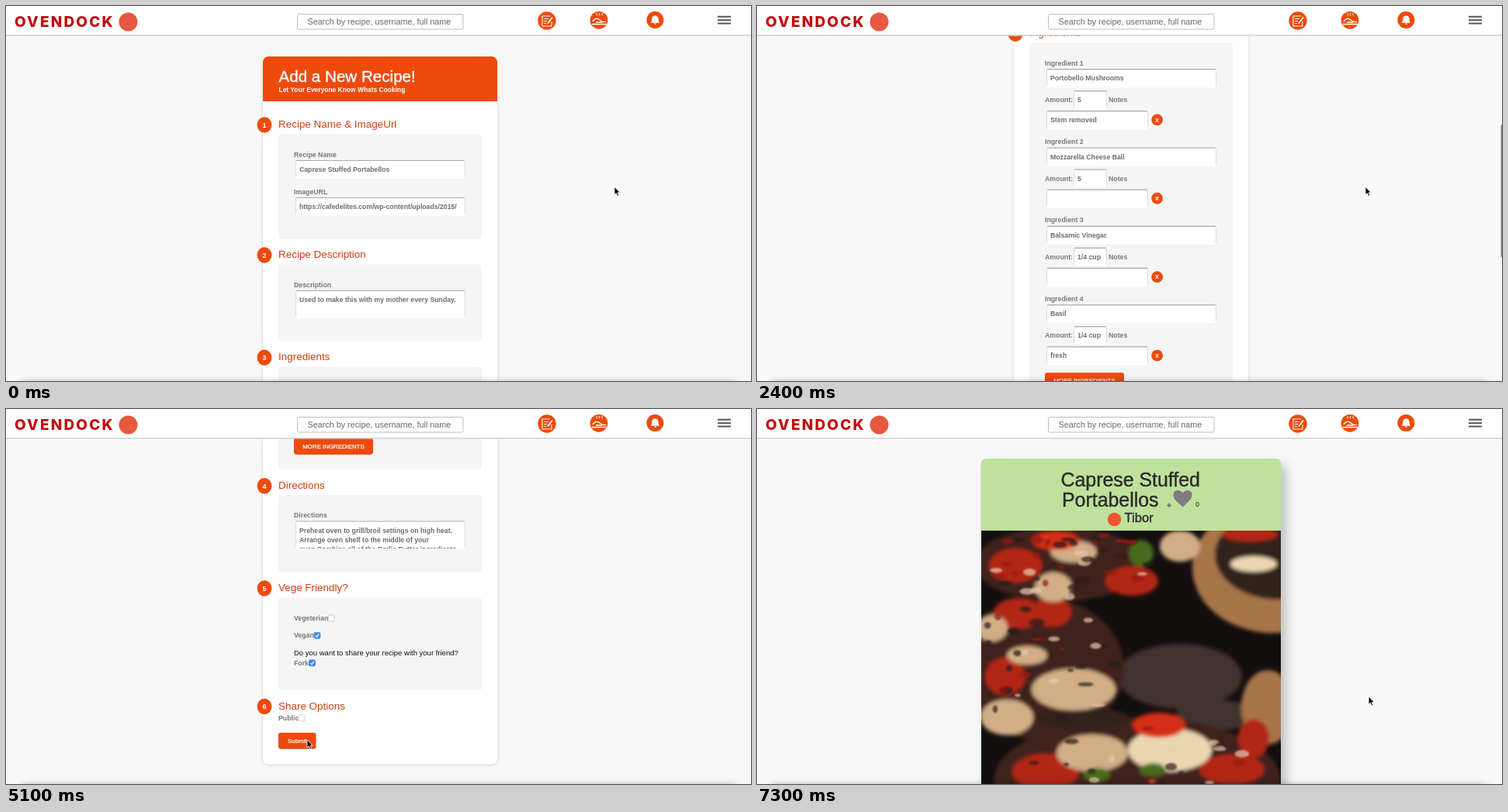
An HTML page that plays this animation: 960 px wide and 484 px high, repeating every 7400 ms.

```html
<!DOCTYPE html>
<html lang="en">
<head>
<meta charset="utf-8">
<title>Recipe form</title>
<style>
  html, body { margin: 0; width: 100%; height: 100%; overflow: hidden; background: #f8f8f8; }
  svg { display: block; width: 960px; height: 484px; font-family: "Liberation Sans", Arial, sans-serif; }
  .logo { font: 800 19px Inter, sans-serif; letter-spacing: 2.2px; fill: #c40a0c; }
  .search { font-size: 10.8px; fill: #686868; }
  .title { font-size: 20.6px; fill: #fff; stroke: #fff; stroke-width: .4px; }
  .subtitle { font-size: 8.45px; font-weight: bold; fill: #fff; }
  .heading { font-size: 13.45px; fill: #d23c10; }
  .label { font-size: 8.75px; font-weight: bold; fill: #777; }
  .value { font-size: 8.7px; font-weight: bold; fill: #6c6c6c; }
  .plain { font-size: 9.5px; fill: #111; }
  .badge { font-size: 9px; font-weight: bold; fill: #fff; text-anchor: middle; }
  .button { font-size: 7.85px; fill: #fff; stroke: #fff; stroke-width: .25px; text-anchor: middle; }
  .dish { font-size: 24.9px; fill: #2b2b2b; stroke: #2b2b2b; stroke-width: .4px; }
  .author { font-size: 16.6px; fill: #2b2b2b; stroke: #2b2b2b; stroke-width: .35px; }
  .count { font-size: 9px; fill: #222; }
</style>
</head>
<body>
<svg id="stage" viewBox="0 0 960 484"></svg>
<script>
const LOOP = 7400, STEP = 100, PAGE_CHANGE = 5700;
const ORANGE = '#ee4a0c';

const text = (cls, x, y, s) => `<text class="${cls}" x="${x}" y="${y}">${s}</text>`;
const rect = (x, y, w, h, fill, extra = '') =>
  `<rect x="${x}" y="${y}" width="${w}" height="${h}" fill="${fill}" ${extra}/>`;
const circle = (x, y, r, fill, extra = '') => `<circle cx="${x}" cy="${y}" r="${r}" fill="${fill}" ${extra}/>`;
const ellipse = (x, y, rx, ry, fill, extra = '') =>
  `<ellipse cx="${x}" cy="${y}" rx="${rx}" ry="${ry}" fill="${fill}" ${extra}/>`;
const line = (d, color, width, extra = '') =>
  `<path d="${d}" fill="none" stroke="${color}" stroke-width="${width}" ${extra}/>`;

// ---- form parts ----
function box(x, y, w, h, value = '') {
  return rect(x, y, w, h, '#fff', 'rx="2"') +
    line(`M${x + .5} ${y + h - 2}V${y + 1}M${x + w - .5} ${y + h - 2}V${y + 1}`, '#ddd', 1) +
    line(`M${x + 1} ${y + .5}h${w - 2}`, '#a9a9a9', 1.2) +
    text('value', x + 5, y + 15, value);
}

function section(n, y, title, panelHeight) {
  return ellipse(333, y + 1, 9.4, 10.2, ORANGE) +
    text('badge', 333, y + 4.3, n) + text('heading', 351, y + 4.6, title) +
    (panelHeight ? rect(351, y + 13, 262, panelHeight, '#f5f5f5', 'rx="4"') : '');
}

function ingredient([name, amount, notes], i) {
  const y = 491.5 + i * 101.4;
  return text('label', 371, y + 3, `Ingredient ${i + 1}`) + box(373, y + 7.5, 219, 24, name) +
    text('label', 371, y + 50.5, 'Amount:') + box(408, y + 35.5, 43, 24, amount) +
    text('label', 453, y + 50.5, 'Notes') + box(373, y + 61.5, 131, 24, notes) +
    circle(515.6, y + 73.2, 7.4, ORANGE) + text('badge', 515.6, y + 76, 'x');
}

function button(x, y, w, h, caption) {
  return rect(x, y, w, h, ORANGE, 'rx="3"') +
    line(`M${x + 2} ${y + h - .4}h${w - 4}`, '#c93d08', .8) +
    text('button', x + w / 2, y + h / 2 + 2.6, caption);
}

function checkbox(x, y, checked) {
  return rect(x - 4, y - 4, 8, 8, checked ? '#3a8cf0' : '#fff',
    `rx="1.8" stroke="${checked ? '#3a8cf0' : '#c4c4c4'}" stroke-width=".8"`) +
    (checked ? line(`M${x - 2} ${y}l1.6 2 2.6 -4.2`, '#fff', 1.1) : '');
}

const ingredients = [
  ['Portobello Mushrooms', '5', 'Stem removed'],
  ['Mozzarella Cheese Ball', '5', ''],
  ['Balsamic Vinegar', '1/4 cup', ''],
  ['Basil', '1/4 cup', 'fresh'],
];
const directions = [
  'Preheat oven to grill/broil settings on high heat.',
  'Arrange oven shelf to the middle of your',
  'oven.Combine all of the Garlic Butter ingredients',
];

const form = `<g id="form">
  ${rect(331, 66, 302, 1247, '#999', 'rx="7" filter="url(#soft)" opacity=".4"')}
  ${rect(331, 65.5, 302, 1246.5, '#fff', 'rx="7"')}
  <path d="M331 123V72.5a7 7 0 0 1 7-7H626a7 7 0 0 1 7 7V123z" fill="${ORANGE}"/>
  ${line('M334 67.2Q336 66 338 66H626Q628 66 630 67.2', '#d43f08', 1.2)}
  ${text('title', 351.5, 97.6, 'Add a New Recipe!')}
  ${text('subtitle', 351.5, 110.8, 'Let Your Everyone Know Whats Cooking')}
  ${section(1, 152.5, 'Recipe Name &amp; ImageUrl', 135.5)}
  ${text('label', 371, 194.6, 'Recipe Name')}${box(373, 199, 219, 24, 'Caprese Stuffed Portabellos')}
  ${text('label', 371, 242.6, 'ImageURL')}
  ${box(373, 247, 219, 24, 'https://cafedelites.com/wp-content/uploads/2015/')}
  ${section(2, 320.5, 'Recipe Description', 99.5)}
  ${text('label', 371, 362.6, 'Description')}
  ${box(373, 367, 219, 36, 'Used to make this with my mother every Sunday.')}
  ${section(3, 452.7, 'Ingredients', 466.3)}
  ${ingredients.map(ingredient).join('')}
  ${button(371, 891, 102, 21, 'MORE INGREDIENTS')}
  ${section(4, 951.7, 'Directions', 99.5)}
  ${text('label', 371, 993.6, 'Directions')}${box(373, 998, 219, 36)}
  <g clip-path="url(#directionsClip)">
    ${directions.map((s, i) => text('value', 378, 1013 + i * 12.2, s)).join('')}
  </g>
  ${section(5, 1084, 'Vege Friendly?', 119.5)}
  ${text('label', 371, 1126.3, 'Vegeterian')}${checkbox(419.3, 1123.5)}
  ${text('label', 371, 1148.5, 'Vegan')}${checkbox(401, 1145.8, true)}
  ${text('plain', 371, 1171.2, 'Do you want to share your recipe with your friend?')}
  ${text('label', 371, 1184, 'Fork')}${checkbox(394.5, 1181.3, true)}
  ${section(6, 1236.5, 'Share Options')}
  ${text('label', 351, 1255.2, 'Public')}${checkbox(381, 1252.4)}
  ${button(351, 1271.3, 48.5, 20.7, 'Submit')}
</g>`;

// ---- recipe page ----
// Soft blobs of the dish picture, back to front: colour, then x, y, rx, ry.
const blobs = [
  ['#40332f', [545, 345, 80, 42], [590, 395, 50, 20]],
  ['#3f211a', [365, 335, 108, 92], [390, 200, 110, 48], [490, 480, 185, 82]],
  ['#a87448', [665, 205, 104, 84], [658, 385, 34, 48]],
  ['#33221f', [672, 188, 82, 58], [420, 400, 60, 14]],
  ['#b22817', [333, 202, 34, 22], [335, 264, 30, 20], [380, 262, 25, 19], [483, 222, 34, 19],
    [320, 345, 26, 24], [372, 468, 43, 23], [612, 465, 42, 19], [635, 162, 36, 9], [640, 425, 20, 25]],
  ['#d2ae86', [382, 230, 24, 19], [408, 184, 30, 14], [303, 283, 20, 17], [545, 177, 26, 20],
    [408, 362, 54, 27], [322, 398, 34, 23], [432, 444, 46, 24], [348, 318, 26, 12]],
  ['#ead7b0', [532, 440, 54, 28], [640, 200, 30, 10]],
  ['#466a1d', [495, 186, 16, 17], [438, 472, 17, 9], [510, 466, 17, 9]],
  ['#d62d12', [518, 408, 34, 16], [385, 170, 30, 12]],
];

let seed = 7;
const random = () => (seed = seed * 16807 % 2147483647) / 2147483647;
const flecks = Array.from({ length: 90 }, () => {
  const angle = random() * 6.283, reach = Math.sqrt(random());
  const [cx, cy, rx, ry] = [[370, 330, 95, 85], [500, 470, 170, 65], [405, 200, 110, 45]][random() * 3 | 0];
  const color = ['#241b17', '#301f1b', '#e9cbb0', '#8d1b12'][random() * 4 | 0];
  return ellipse(cx + Math.cos(angle) * rx * reach, cy + Math.sin(angle) * ry * reach,
    3 + random() * 7, 2 + random() * 3, color, 'opacity=".7"');
}).join('');

const picture = `<g clip-path="url(#pictureClip)">
  ${rect(289, 157, 386, 327, '#140f0f')}
  <g filter="url(#blur)">
    ${blobs.map(([color, ...list]) => list.map(b => ellipse(...b, color)).join('')).join('')}
  </g>
  <g filter="url(#fine)">${flecks}</g>
</g>`;

const recipe = `<g id="recipe">
  ${rect(296, 72, 386, 440, '#777', 'rx="7" filter="url(#cardShadow)" opacity=".45"')}
  <path d="M288.5 157V71a7 7 0 0 1 7-7H668.5a7 7 0 0 1 7 7V157z" fill="#bfe19b"/>
  ${picture}
  ${text('dish', 391.5, 100.3, 'Caprese Stuffed')}${text('dish', 393, 126.4, 'Portabellos')}
  <g id="spinner">${circle(0, 0, 1.5, 'none', 'stroke="#555" stroke-width=".8"')}
    ${line('M-3 0H3M0-3V3', '#555', .7)}</g>
  <path d="M548.5 126.5C543 121 536.5 117 536.5 111C536.5 104 545 103 548.5 108.5C552 103 560.5 104 560.5 111C560.5 117 554 121 548.5 126.5z" fill="#7f7b80"/>
  ${text('count', 565, 126.3, '0')}
  ${circle(460.5, 142.5, 8.7, '#ee5530')}
  ${text('author', 473.5, 145.6, 'Tibor')}
</g>`;

// ---- fixed header ----
const header = `
  ${rect(0, 0, 960, 38.6, '#d2d2d2', 'filter="url(#thin)"')}${rect(0, 0, 960, 37, '#fff')}
  ${text('logo', 11, 27, 'OVENDOCK')}${circle(157.5, 20.5, 12, '#e8573f')}
  ${rect(375.5, 10.5, 213.5, 19.5, '#fff', 'rx="2" stroke="#bdbdbd"')}
  ${text('search', 388.5, 23.8, 'Search by recipe, username, full name')}
  ${circle(697, 19, 11.7, ORANGE)}
  ${line('M703 20V26H691V13H701M693 16.5h6M693 19.5h4M693 22.5h3', '#fff', 1.1)}
  ${line('M698 22.5L704 14.5', '#fff', 2)}
  ${circle(764, 18.3, 11.4, ORANGE)}
  ${line('M755 23.5H774M756 20Q760 14 765 18T773 20M760 21h8', '#fff', 1.4)}
  ${line('M761.5 9q-1.5 2 0 3.5M765 9q-1.5 2 0 3.5M768.5 9q-1.5 2 0 3.5', '#fff', 1)}
  ${circle(836.4, 18, 11, ORANGE)}
  <path d="M830.5 21.8Q832.3 20 832.3 16.5Q832.5 12.5 836.4 12.2Q840.3 12.5 840.5 16.5Q840.5 20 842.3 21.8zM834.7 22.6h3.4q-1.7 2.6-3.4 0z" fill="#fff"/>
  ${line('M917 13.8h17M917 18.2h17M917 22.6h17', '#555', 2)}`;

const clip = (id, ...r) => `<clipPath id="${id}">${rect(...r, '#000')}</clipPath>`;
const blur = (id, amount) =>
  `<filter id="${id}" x="-20%" y="-20%" width="140%" height="140%"><feGaussianBlur stdDeviation="${amount}"/></filter>`;

document.getElementById('stage').innerHTML = `
  <defs>
    ${blur('soft', 2)}${blur('thin', .6)}${blur('blur', 2.6)}${blur('fine', .9)}${blur('cardShadow', 7)}
    <filter id="edge" x="-5%" y="-300%" width="110%" height="700%"><feGaussianBlur stdDeviation="5"/></filter>
    ${clip('directionsClip', 373, 998, 219, 35.5)}${clip('pictureClip', 289, 157, 386, 327)}
  </defs>
  ${rect(0, 0, 960, 484, '#f8f8f8')}
  ${form}${recipe}${header}
  ${rect(20, 485, 920, 10, '#000', 'filter="url(#edge)" opacity=".3"')}
  <rect id="scrollbar" x="958.5" width="3" height="171.5" rx="1.5" fill="#858585"/>
  <path id="cursor" d="M0 0V10L2.3 8L4 11.8L5.7 11L4.1 7.3H7.2z" fill="#000" stroke="#fff" stroke-width=".8"/>`;

// ---- motion ----
const [formNode, recipeNode, spinner, scrollbar, cursor] =
  ['form', 'recipe', 'spinner', 'scrollbar', 'cursor'].map(id => document.getElementById(id));
const progress = (t, from, to) => Math.min(1, Math.max(0, (t - from) / (to - from)));
const smooth = p => p * p * (3 - 2 * p);
const mix = (a, b, p) => a + (b - a) * p;

const scrollKeys = [[900, 0], [1100, 59], [1900, 274.5], [3100, 618.5], [4000, 853.5]];
function scrollAt(t) {
  let y = 0;
  for (let i = 1; i < scrollKeys.length; i++) {
    const [t0, y0] = scrollKeys[i - 1], [t1, y1] = scrollKeys[i];
    y += (y1 - y0) * progress(t, t0, t1);
  }
  return y;
}

function draw(t) {
  const scroll = scrollAt(t), onRecipe = t >= PAGE_CHANGE;
  formNode.setAttribute('transform', `translate(0 ${-scroll})`);
  formNode.style.display = onRecipe ? 'none' : '';
  recipeNode.style.display = onRecipe ? '' : 'none';
  scrollbar.setAttribute('y', 1.2 + scroll * .3634);
  scrollbar.style.opacity = t > 900 ? 1 - progress(t, 4700, 5000) : 0;
  spinner.setAttribute('transform', `translate(531 124.3) rotate(${(t - 7300) * .15})`);

  const toSubmit = smooth(progress(t, 4200, 5100)), away = smooth(progress(t, 6100, 7350));
  const x = mix(mix(784, 388, toSubmit), 790, away);
  const y = mix(mix(233.5, 427, toSubmit), 371, away);
  cursor.setAttribute('transform', `translate(${x} ${y})`);
}

function frame() {
  const t = performance.now() % LOOP;
  draw(Math.floor(t / STEP) * STEP);
  requestAnimationFrame(frame);
}
frame();
</script>
</body>
</html>
```
